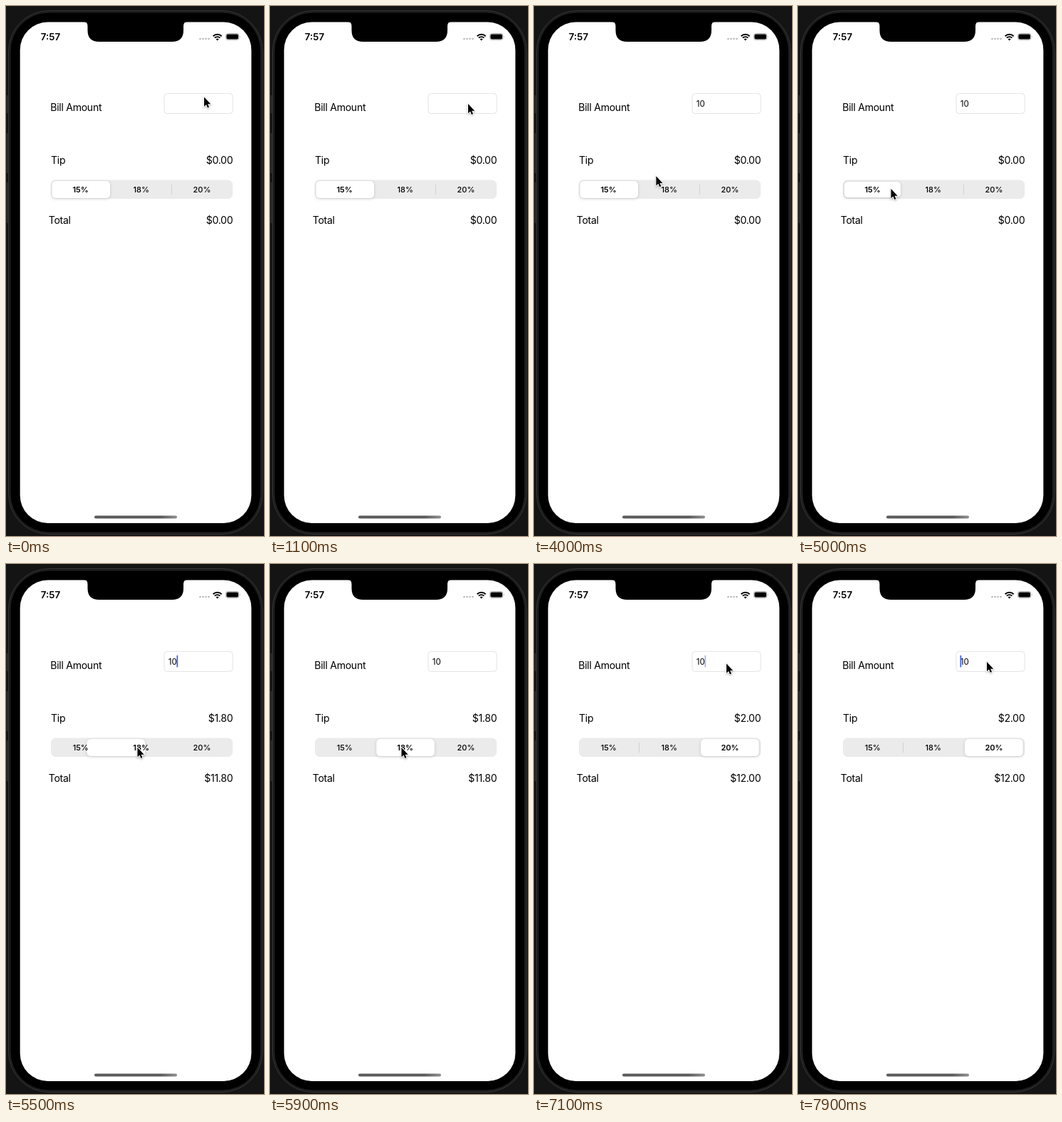
Animation, 362 px wide and 742 px high, one loop 8 s. Source, as an HTML page:

```html
<!DOCTYPE html>
<html lang="en">
<head>
<meta charset="utf-8">
<title>Tip calculator</title>
<style>
  html, body { margin: 0; height: 100%; overflow: hidden; background: #141414; }
  svg { display: block; width: 362px; height: 742px; }
  text { font: 14.1px Inter, Roboto, sans-serif; letter-spacing: -.3px; }
  .end { text-anchor: end; }
  .clock { font-size: 13.3px; font-weight: 600; letter-spacing: 0; text-anchor: middle; }
  .seg text { font-size: 11px; font-weight: 500; letter-spacing: 0; text-anchor: middle; }
  #amount { font-size: 11.6px; letter-spacing: 0; }
  #thumb { filter: drop-shadow(0 1.5px 2px rgba(0, 0, 0, .16)); }
  #cursor { filter: drop-shadow(0 1px 1px rgba(0, 0, 0, .3)); }
</style>
</head>
<body>
<svg viewBox="0 0 362 742">
  <linearGradient id="bar">
    <stop stop-color="#5a5a5a"/><stop offset=".8" stop-color="#5a5a5a"/><stop offset="1" stop-color="#909090"/>
  </linearGradient>

  <!-- phone -->
  <path d="M2 125v25M2 178v56M2 247v57" stroke="#292929" stroke-width="3"/>
  <rect x="3.5" y="6.5" width="356.5" height="733" rx="57" fill="#1a1a1a" stroke="#363636"/>
  <rect x="6" y="9" width="351.5" height="728" rx="54" stroke="#222"/>
  <rect x="19.7" y="22.5" width="324.6" height="701.5" rx="39"  fill="#fff"/>
  <path d="M109 22q5.5 0 5.5 6v6q0 16 16 16h102.500q16 0 16-16v-6q0-6 5.500-6z"/>
  <rect x="124" y="713.5" width="116" height="4" rx="2" fill="url(#bar)"/>

  <!-- status bar -->
  <text class="clock" x="62.5" y="47.5">7:57</text>
  <path d="M272.500 46h12.100" stroke="#b8b8b8" stroke-width="2.600" stroke-linecap="round" stroke-dasharray="0 4"/>
  <path d="M290.600 42.200a8.700 8.700 0 0 1 12 0M292.800 44.700a5.400 5.400 0 0 1 7.600 0" fill="none" stroke="#000" stroke-width="1.900"/>
  <path d="M294.600 46.400a2.800 2.800 0 0 1 4 0l-2 2z"/>
  <rect x="308.5" y="38.5" width="18.5" height="9" rx="2.8" fill="none" stroke="#b4b4b4"/>
  <rect x="309.4" y="39.4" width="16.6" height="7.2" rx="1.8"/>
  <path d="M328.200 41.500q1.600 1.500 0 3z" fill="#b4b4b4"/>

  <!-- form -->
  <text x="62.3" y="147">Bill Amount</text>
  <rect x="222" y="122.5" width="96" height="28" rx="4" fill="#fff" stroke="#e4e4e4"/>
  <text id="amount" x="227.8" y="140.6"></text>
  <rect id="caret" y="128" width="1.7" height="16.5" fill="#3f5fe0"/>
  <text x="63" y="221">Tip</text>
  <text id="tip" class="end" x="318.3" y="221"></text>
  <g class="seg">
    <rect x="63" y="243.5" width="255" height="26.5" rx="6.5" fill="#ebebeb"/>
    <rect class="line" x="147" y="250" width="1" height="14" fill="#d2d2d2"/>
    <rect class="line" x="232" y="250" width="1" height="14" fill="#d2d2d2"/>
    <rect id="thumb" rx="5.5" fill="#fff"/>
    <text x="104.7" y="261">15%</text>
    <text x="189.7" y="261">18%</text>
    <text x="275" y="261">20%</text>
  </g>
  <text x="59.7" y="305">Total</text>
  <text id="total" class="end" x="318.3" y="305"></text>

  <path id="cursor" d="M0 0V13.200L3 10.500 4.900 15 7 14.100 5.100 9.700H9.200Z" stroke="#fff" stroke-width="1.800" paint-order="stroke"/>
</svg>
<script>
const LOOP = 8000, STEP = 100;
const BILL = '10', RATES = [.15, .18, .2];
const PICKS = [5400, 6300];            // taps on the second and third segment
const KEYS = [2900, 3200];             // key presses
const FOCUS = 200, REWIND = 7300;      // taps that place the caret

// pointer moves: start, end, x, y
const MOVES = [
  [50, 300, 278, 137],
  [3680, 4080, 159, 250],
  [4350, 4600, 130.5, 256],
  [5050, 5350, 184.5, 257],
  [5950, 6250, 272, 257],
  [6500, 7100, 270, 139.5],
  [7100, 7400, 265, 137]
];

const $ = id => document.getElementById(id);
const lines = document.querySelectorAll('.line');
const labels = document.querySelectorAll('.seg text');
const set = (el, attrs) => { for (const k in attrs) el.setAttribute(k, attrs[k]); };
const money = v => '$' + v.toFixed(2);
const past = (times, t) => times.filter(s => t >= s).length;
const clamp = u => Math.min(1, Math.max(0, u));
const easeOut = u => 1 - (1 - clamp(u)) ** 3;
const smooth = u => clamp(u) ** 2 * (3 - 2 * clamp(u));

function pointer(t) {
  let x = 278, y = 127.5;
  for (const [start, end, toX, toY] of MOVES) {
    const k = smooth((t - start) / (end - start));
    x += (toX - x) * k;
    y += (toY - y) * k;
  }
  return `translate(${x} ${y})`;
}

// the caret blinks, but stays lit for a while after each touch
function caretOpacity(t) {
  if (t < FOCUS) return 0;
  if ([FOCUS, KEYS[0], REWIND].some(s => t >= s && t - s <= 700)) return 1;
  return clamp(.95 + 1.2 * Math.cos(2 * Math.PI * (t - 1670) / 955));
}

function draw(t) {
  const typed = past(KEYS, t), pick = past(PICKS, t);
  $('amount').textContent = BILL.slice(0, typed);
  set($('caret'), { x: 227.5 + (t < REWIND ? 6 * typed : 0), opacity: caretOpacity(t) });

  const tip = pick && BILL * RATES[pick];
  $('tip').textContent = money(tip);
  $('total').textContent = money(pick && +BILL + tip);

  const slide = PICKS.reduce((sum, s) => sum + easeOut((t - s) / 400), 0);
  const press = smooth((t - 4700) / 200) - smooth((t - 5100) / 200);
  set($('thumb'), {
    x: 64.5 + 84.8 * slide + .5 * press, y: 245 + press,
    width: 81.5 - 2.5 * press, height: 24 - 2 * press
  });
  lines.forEach((el, i) => set(el, { opacity: pick === i || pick === i + 1 ? 0 : 1 }));
  labels.forEach((el, i) => { el.style.fontWeight = i === pick ? 600 : 500; });

  const hidden = t >= KEYS[0] && t < 3700;
  set($('cursor'), { transform: pointer(t), visibility: hidden ? 'hidden' : 'visible' });
}

function frame() {
  const t = performance.now() % LOOP;
  draw(Math.floor(t / STEP) * STEP);
  requestAnimationFrame(frame);
}
frame();
</script>
</body>
</html>
```
